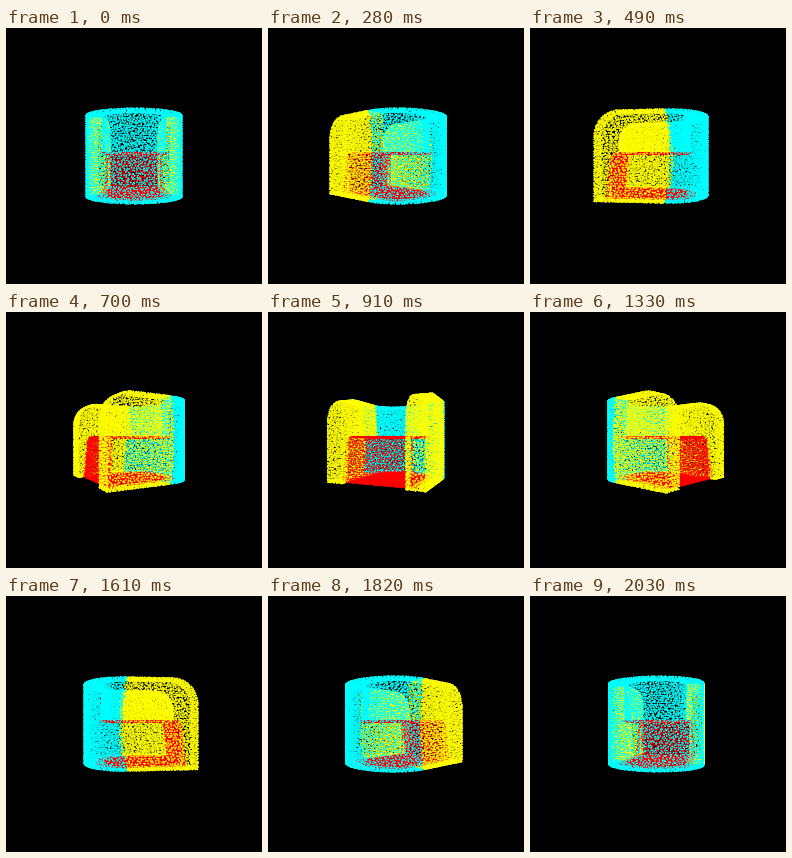
A matplotlib script for the animation above (2100 ms loop, 256 by 256 pixels).

```python
import numpy as np
import matplotlib.pyplot as plt
from matplotlib.animation import FuncAnimation

SIZE, FRAMES, LOOP = 256, 30, 2100
DIST, FOCAL = 3.0, SIZE / 2 / np.tan(np.pi / 6)
RADIUS = 1.28            # splat radius in pixels
STEP = 0.0295            # spacing of the sampled points

# Armchair measures: y is up, the front faces +z
TOP, FRONT, JOIN, CURVE = 0.505, 0.65, -0.14, 0.28
OUT_W, OUT_BACK = 0.605, -0.655
IN_W, IN_BACK = 0.40, -0.43
SEAT_Y, SEAT_W, SEAT_FRONT = 0.035, 0.42, 0.51
BASE_W, BASE_FRONT, BASE_BACK = 0.47, 0.56, -0.5

CYAN, YELLOW, RED = (0, 1, 1), (1, 1, 0), (1, 0, 0)

rng = np.random.default_rng(7)


def sheet(length, width):
    """Evenly scattered points on a flat patch."""
    rows = np.linspace(0, width, round(width / (STEP * 0.866)) + 1)
    cols = np.arange(0, length, STEP)
    u, v = np.meshgrid(cols, rows)
    u = u + (np.arange(len(rows)) % 2)[:, None] * STEP / 2
    u = u + rng.normal(0, 0.21 * STEP, u.shape)
    v = v + rng.normal(0, 0.21 * STEP, v.shape)
    return np.clip(u.ravel(), 0, length), np.clip(v.ravel(), 0, width)


def rail(w, back):
    """Plan outline: straight arms joined by a rounded back."""
    t = np.linspace(0, np.pi, 200)
    x, z = w * np.cos(t), JOIN + (back - JOIN) * np.sin(t)
    return np.r_[w, x, -w], np.r_[FRONT, z, FRONT]


def arc_length(x, z):
    return np.r_[0, np.cumsum(np.hypot(np.diff(x), np.diff(z)))]


def wall(w, back):
    x, z = rail(w, back)
    s = arc_length(x, z)
    u, v = sheet(s[-1], 2 * TOP)
    p = np.c_[np.interp(u, s, x), v - TOP, np.interp(u, s, z)]
    dy, dz = p[:, 1] - TOP + CURVE, p[:, 2] - FRONT + CURVE
    return p[~((dy > 0) & (dz > 0) & (np.hypot(dy, dz) > CURVE))]


def rim(y):
    """Flat band between the inner and outer walls."""
    xo, zo = rail(OUT_W, OUT_BACK)
    xi, zi = rail(IN_W, IN_BACK)
    s = arc_length((xo + xi) / 2, (zo + zi) / 2)
    gap = OUT_W - IN_W
    u, v = sheet(s[-1], gap)
    t = v / gap
    x = np.interp(u, s, xi) * (1 - t) + np.interp(u, s, xo) * t
    z = np.interp(u, s, zi) * (1 - t) + np.interp(u, s, zo) * t
    return np.c_[x, np.full_like(x, y), z]


def nose(side):
    """Front of an arm, bending over into its top."""
    rise = 2 * TOP - CURVE
    u, v = sheet(rise + CURVE * np.pi / 2, OUT_W - IN_W)
    a = np.clip((u - rise) / CURVE, 0, np.pi / 2)
    y = np.minimum(u, rise) - TOP + CURVE * np.sin(a)
    z = FRONT - CURVE * (1 - np.cos(a))
    return np.c_[side * (IN_W + v), y, z]


def slab(y, w, front, back):
    """Level face of the seat with a rounded rear."""
    u, v = sheet(2 * w, front - back)
    x, z = u - w, v + back
    bend = np.minimum(z - JOIN, 0) / (back - JOIN)
    p = np.c_[x, np.full_like(x, y), z]
    return p[np.abs(x / w) ** 2.5 * (bend > 0) + bend ** 2.5 <= 1.02]


def seat():
    height = SEAT_Y + TOP
    u, v = sheet(2 * SEAT_W, height)
    y, drop = v - TOP, 1 - v / height
    bend = np.maximum(y - SEAT_Y + 0.05, 0) / 0.05
    x = (u - SEAT_W) * (1 + (BASE_W / SEAT_W - 1) * drop)
    z = SEAT_FRONT + (BASE_FRONT - SEAT_FRONT) * drop
    z = z - 0.05 * (1 - np.sqrt(np.maximum(1 - bend ** 2, 0)))
    return np.vstack([np.c_[x, y, z],
                      slab(SEAT_Y, SEAT_W, SEAT_FRONT - 0.03, IN_BACK),
                      slab(-TOP, BASE_W, BASE_FRONT, BASE_BACK)])


def build():
    inner = wall(IN_W, IN_BACK)
    inner = inner[(inner[:, 1] > SEAT_Y) | (inner[:, 2] > SEAT_FRONT)]
    top = rim(TOP)
    top = top[top[:, 2] < FRONT - CURVE]
    shell = np.vstack([wall(OUT_W, OUT_BACK), inner, top, rim(-TOP),
                       nose(1), nose(-1)])
    y, z = shell[:, 1], shell[:, 2]
    edge = -0.135 - 0.05 * (1 - (y / TOP) ** 2) + rng.normal(0, 0.008, len(y))
    tint = np.where((z < edge)[:, None], CYAN, YELLOW)
    cushion = seat()
    return (np.vstack([shell, cushion]),
            np.vstack([tint, np.tile(RED, (len(cushion), 1))]).astype(float))


points, colors = build()
dx, dy = (g.ravel() for g in np.meshgrid([-1, 0, 1], [-1, 0, 1]))


def render(i):
    """Splat the points with soft discs, blended front to back."""
    a = np.radians(180 - 360 * i / FRAMES)
    x, y, z = points.T
    depth = DIST - (x * np.sin(a) + z * np.cos(a))
    sx = SIZE / 2 + FOCAL * (x * np.cos(a) - z * np.sin(a)) / depth
    sy = SIZE / 2 - FOCAL * y / depth

    px = np.floor(sx).astype(int)[:, None] + dx
    py = np.floor(sy).astype(int)[:, None] + dy
    d2 = (px + 0.5 - sx[:, None]) ** 2 + (py + 0.5 - sy[:, None]) ** 2
    alpha = np.minimum(1 - d2 / RADIUS ** 2, 0.999)
    who, k = np.nonzero(alpha > 0)
    alpha, cell = alpha[who, k], py[who, k] * SIZE + px[who, k]

    order = np.lexsort((depth[who], cell))
    who, alpha, cell = who[order], alpha[order], cell[order]
    logs = np.log1p(-alpha)
    before = np.cumsum(logs) - logs
    first = np.r_[True, cell[1:] != cell[:-1]]
    start = before[first][np.cumsum(first) - 1]
    weight = alpha * np.exp(before - start)

    image = [np.bincount(cell, weight * colors[who, c], SIZE * SIZE)
             for c in range(3)]
    return np.clip(np.array(image).T.reshape(SIZE, SIZE, 3), 0, 1)


fig = plt.figure(figsize=(SIZE / 100, SIZE / 100), dpi=100, facecolor="black")
ax = fig.add_axes([0, 0, 1, 1])
ax.axis("off")
view = ax.imshow(render(0), interpolation="nearest", aspect="auto")


def update(i):
    view.set_data(render(i))
    return [view]


anim = FuncAnimation(fig, update, frames=FRAMES, interval=LOOP / FRAMES,
                     repeat=True, repeat_delay=0)
plt.show()
```
